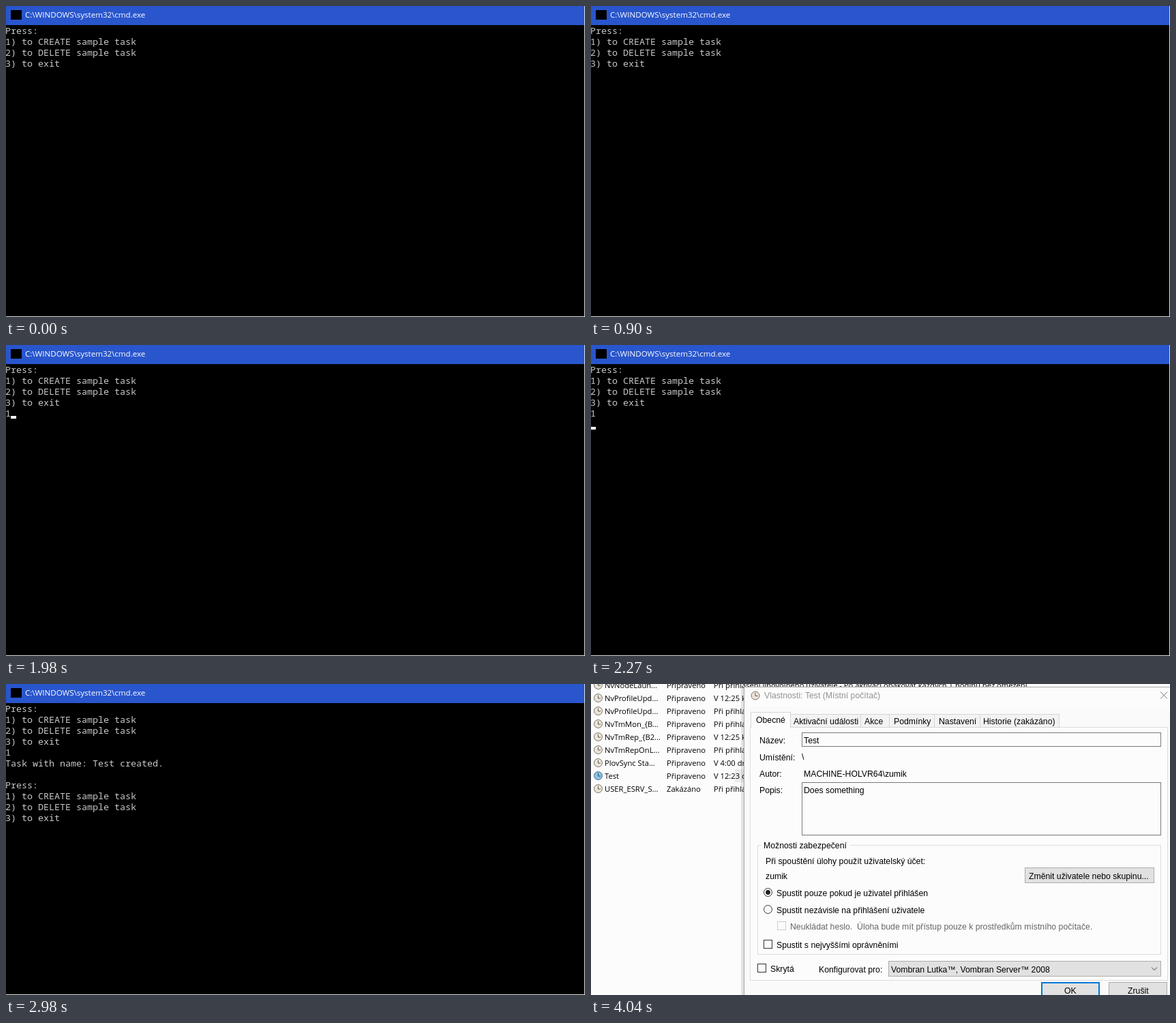
An HTML page with a canvas for the animation above (6.6 s loop, 849 by 456 pixels).

```html
<!DOCTYPE html>
<html lang="cs">
<head>
<meta charset="utf-8">
<title>Console and task properties</title>
<style>
html, body { margin: 0; width: 849px; height: 456px; overflow: hidden; background: #000; }
canvas { display: block; }
</style>
</head>
<body>
<canvas id="stage" width="849" height="456"></canvas>
<script>
const ctx = document.getElementById("stage").getContext("2d", { alpha: false });
const LOOP = 6600;
const DIALOG_AT = 4040;
const MONO = '13.333px "Noto Sans Mono", monospace';
const TITLE = '11.55px "Open Sans", sans-serif';
const LIST = '11.2px "Open Sans", sans-serif';
const UI = '12.25px "Liberation Sans", sans-serif';
const PAPER = "#fcfcfc";

const MENU = ["Press:", "1) to CREATE sample task", "2) to DELETE sample task", "3) to exit"];

// Cursor cells as [start, end, column, row]
const CURSOR = [
  [360, 900, 0, 4], [1290, 1440, 1, 4], [1980, 2270, 1, 4],
  [2270, 2350, 0, 5], [2350, 2980, 0, 11], [3520, 4040, 0, 11]
];

const TASKS = [
  ["NvNodeLaun...", "Připraveno", "Při přihlášení libovolného uživatele - Po aktivaci opakovat každých 1 hodinu bez omezení."],
  ["NvProfileUpd...", "Připraveno", "V 12:25 každý den"],
  ["NvProfileUpd...", "Připraveno", "Při přihlášení"],
  ["NvTmMon_{B...", "Připraveno", "Při přihlášení"],
  ["NvTmRep_{B2...", "Připraveno", "V 12:25 každý den"],
  ["NvTmRepOnL...", "Připraveno", "Při přihlášení"],
  ["PlovSync Sta...", "Připraveno", "V 4:00 dne"],
  ["Test", "Připraveno", "V 12:23 dne"],
  ["USER_ESRV_S...", "Zakázáno", "Při přihlášení"]
];

const TABS = [
  ["Aktivační události", 292, 395, 297], ["Akce", 395, 437, 401],
  ["Podmínky", 437, 503, 444], ["Nastavení", 503, 570, 510],
  ["Historie (zakázáno)", 570, 686, 575]
];

function rect(x, y, w, h, color) {
  ctx.fillStyle = color;
  ctx.fillRect(x, y, w, h);
}

function box(x, y, w, h, border, fill, line = 1) {
  rect(x, y, w, h, border);
  rect(x + line, y + line, w - 2 * line, h - 2 * line, fill);
}

function text(str, x, y, font = UI, color = "#000") {
  ctx.font = font;
  ctx.fillStyle = color;
  ctx.fillText(str, x, y);
}

function path(points, color, width = 1) {
  ctx.beginPath();
  points.forEach(([x, y], i) => i ? ctx.lineTo(x, y) : ctx.moveTo(x, y));
  ctx.strokeStyle = color;
  ctx.lineWidth = width;
  ctx.stroke();
}

function disc(x, y, r, fill, stroke) {
  ctx.beginPath();
  ctx.arc(x, y, r, 0, Math.PI * 2);
  ctx.fillStyle = fill;
  ctx.fill();
  if (stroke) {
    ctx.strokeStyle = stroke;
    ctx.lineWidth = 1;
    ctx.stroke();
  }
}

function clock(x, y, selected) {
  disc(x, y, 6, selected ? "#8fc0de" : "#ebe5d8", selected ? "#3f7695" : "#77736b");
  path([[x, y - 4], [x, y + 0.5], [x + 3.5, y + 0.5]], selected ? "#22557a" : "#5f5b54");
}

function radio(x, y, on) {
  disc(x, y, 6, PAPER, "#333");
  if (on) disc(x, y, 3.4, "#222");
}

function drawConsole(t) {
  rect(0, 0, 849, 456, "#000");
  rect(0, 0, 848, 28, "#2956cd");
  rect(7, 6, 16, 14, "#000");
  text("C:\\WINDOWS\\system32\\cmd.exe", 28, 17, TITLE, "#fff");

  let lines = MENU;
  if (t >= 1290) lines = [...lines, "1"];
  if (t >= 2350) lines = [...lines, "Task with name: Test created.", "", ...MENU];
  lines.forEach((line, i) => text(line, -1, 41 + 16 * i, MONO, "#c8c8c8"));

  for (const [from, to, col, row] of CURSOR) {
    if (t >= from && t < to) rect(col * 8 - 1, 40 + row * 16, 8, 4, "#fff");
  }
  rect(848, 0, 1, 456, "#dedede");
  rect(0, 455, 849, 1, "#dedede");
}

function drawTasks() {
  rect(0, 0, 849, 456, PAPER);
  rect(211, 125, 14, 19, "#ececec");
  TASKS.forEach(([name, state, trigger], i) => {
    const y = 6 + 19 * i;
    clock(10.5, y - 4.5, name === "Test");
    text(name, 20, y, LIST);
    text(state, 111, y, LIST);
    text(trigger, 180, y, LIST);
  });
}

function drawTabs() {
  box(233, 63, 613, 372, "#dcdcdc", PAPER);
  for (const [label, left, right, x] of TABS) {
    box(left, 44, right - left + 1, 20, "#d5d5d5", "#f3f3f3");
    text(label, x, 59);
  }
  box(234, 41, 59, 23, "#d5d5d5", PAPER);
  rect(235, 62, 57, 3, PAPER);
  text("Obecné", 242, 57);
}

function drawGeneral() {
  text("Název:", 247, 87);
  box(309, 71, 527, 21, "#7a7a7a", PAPER);
  text("Test", 312, 87);
  text("Umístění:", 247, 112);
  text("\\", 309, 111);
  text("Autor:", 247, 136);
  text("MACHINE-HOLVR64\\zumik", 312, 136);
  text("Popis:", 247, 160);
  box(309, 144, 527, 78, "#7a7a7a", PAPER);
  text("Does something", 312, 160);
}

function drawSecurity() {
  box(244, 236, 592, 161, "#dcdcdc", PAPER);
  rect(250, 235, 130, 3, PAPER);
  text("Možnosti zabezpečení", 253, 241);
  text("Při spouštění úlohy použít uživatelský účet:", 256, 264);
  text("zumik", 256, 286);
  box(636, 269, 190, 23, "#adadad", "#e1e1e1");
  text("Změnit uživatele nebo skupinu...", 642, 286);

  radio(259.5, 305.5, true);
  text("Spustit pouze pokud je uživatel přihlášen", 272, 311);
  radio(259.5, 330.5, false);
  text("Spustit nezávisle na přihlášení uživatele", 272, 336);
  box(273, 348, 13, 13, "#cccccc", PAPER);
  text("Neukládat heslo.  Úloha bude mít přístup pouze k prostředkům místního počítače.", 292, 360, UI, "#666");
  box(253, 375, 13, 13, "#333", PAPER);
  text("Spustit s nejvyššími oprávněními", 272, 387);
}

function drawFooter() {
  box(244, 410, 13, 13, "#333", PAPER);
  text("Skrytá", 263, 422);
  text("Konfigurovat pro:", 334, 423);
  box(436, 406, 400, 23, "#adadad", "#e1e1e1");
  text("Vombran Lutka™, Vombran Server™ 2008", 440, 423);
  path([[822, 415.5], [826, 419.5], [830, 415.5]], "#444");

  box(660, 437, 86, 24, "#0078d7", "#e1e1e1", 2);
  text("OK", 694, 454);
  box(759, 437, 86, 24, "#adadad", "#e1e1e1");
  text("Zrušit", 787, 454);
}

function drawDialog() {
  drawTasks();
  rect(220, 4, 4, 452, "rgba(0, 0, 0, 0.1)");
  box(224, 4, 630, 460, "#a8a8a8", "#fafafa");
  rect(225, 5, 624, 28, PAPER);
  clock(241, 17, false);
  text("Vlastnosti: Test (Místní počítač)", 254, 21, UI, "#929292");
  path([[835, 11.5], [845, 21.5]], "#777");
  path([[845, 11.5], [835, 21.5]], "#777");
  drawTabs();
  drawGeneral();
  drawSecurity();
  drawFooter();
}

const start = performance.now();

function tick() {
  const t = (performance.now() - start) % LOOP;
  if (t < DIALOG_AT) drawConsole(t);
  else drawDialog();
  requestAnimationFrame(tick);
}
tick();
</script>
</body>
</html>
```
